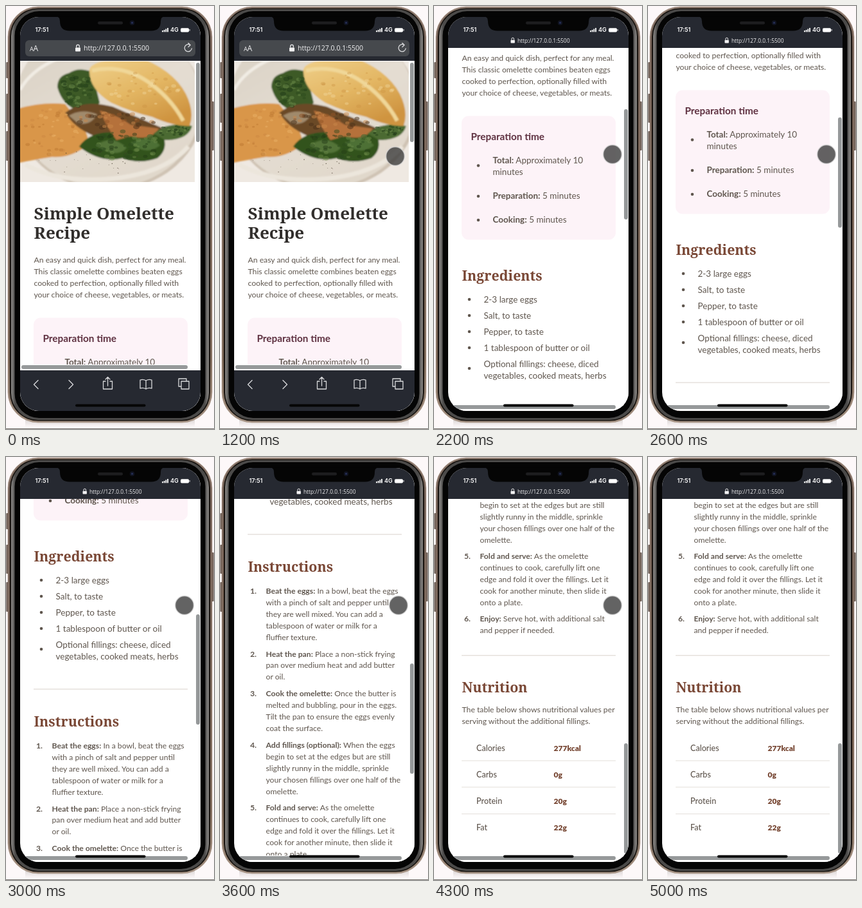
Write an HTML page that moves like this. It is 324 by 656 pixels and loops after 6400 ms.

```html
<!DOCTYPE html>
<html lang="en">
<head>
<meta charset="utf-8">
<title>Recipe page on a phone</title>
<style>
  html, body { margin: 0; width: 100%; height: 100%; overflow: hidden; background: #fdf8f9; }
  svg { display: block; width: 324px; height: 656px; }
  text { font-family: Lato, sans-serif; fill: #5f564e; white-space: pre; }
  .body { font-size: 12.2px; }
  .list { font-size: 13.5px; }
  .cell { font-size: 12.6px; font-weight: 500; }
  .value { font-size: 12px; font-weight: 900; fill: #74432f; }
  .card { font-size: 15.3px; font-weight: 700; fill: #5e3040; }
  .h1, .h2 { font-family: "Noto Serif", serif; font-weight: 600; }
  .h1 { font-size: 26px; fill: #312e2c; }
  .h2 { font-size: 21.4px; fill: #7a4836; }
  .bold { font-weight: 700; }
  .dot { fill: #5f564e; }
  .ui text { font-family: "Open Sans", "Noto Sans", sans-serif; fill: #f1f1f2; }
  .ui .status { font: 600 9px Inter, sans-serif; fill: #fff; }
  .icon { fill: none; stroke: #d9dadc; stroke-width: 1.3; stroke-linecap: round; stroke-linejoin: round; }
</style>
</head>
<body>
<svg viewBox="0 0 324 656">
  <defs>
    <clipPath id="screen"><rect x="22" y="17" width="281" height="611" rx="29"/></clipPath>
    <clipPath id="photo"><rect x="22" width="272" height="187"/></clipPath>
    <linearGradient id="rim" x2="0" y2="1">
      <stop offset="0" stop-color="#8d7a6e"/><stop offset=".1" stop-color="#6d594e"/>
      <stop offset=".85" stop-color="#75604f"/><stop offset="1" stop-color="#a28f80"/>
    </linearGradient>
    <linearGradient id="sheen">
      <stop offset="0" stop-color="#8b8987"/><stop offset=".02" stop-color="#4b4a49"/>
      <stop offset=".98" stop-color="#4b4a49"/><stop offset="1" stop-color="#8b8987"/>
    </linearGradient>
    <linearGradient id="floor" x2="0" y2="1">
      <stop offset="0" stop-color="#d9d3d2"/><stop offset="1" stop-color="#fdf8f9"/>
    </linearGradient>
    <linearGradient id="plate" x1=".2" x2=".8" y2="1">
      <stop offset="0" stop-color="#d9d0c3"/><stop offset=".5" stop-color="#e4ddd2"/><stop offset="1" stop-color="#e0d7ca"/>
    </linearGradient>
    <linearGradient id="egg" x2=".6" y2="1">
      <stop offset="0" stop-color="#efd08a"/><stop offset=".55" stop-color="#e3b663"/><stop offset="1" stop-color="#cf9440"/>
    </linearGradient>
    <filter id="soft"><feGaussianBlur stdDeviation=".8"/></filter>
  </defs>

  <!-- phone body -->
  <rect x="30" y="640" width="264" height="13" fill="url(#floor)"/>
  <rect y="655" width="324" height="1" fill="#77736f"/>
  <g fill="#5d4d44">
    <rect x="0.5" y="87" width="4" height="25" rx="1"/>
    <rect x="0.5" y="136" width="4" height="45" rx="1"/>
    <rect x="0.5" y="194" width="4" height="46" rx="1"/>
    <rect x="319.5" y="148" width="4" height="76" rx="1"/>
  </g>
  <rect x="3" y="1" width="318" height="645" rx="47" fill="url(#rim)" stroke="#b3a195" stroke-width=".8"/>
  <rect x="6" y="3.5" width="312" height="640" rx="44" fill="#17130f"/>
  <rect x="8" y="5" width="308" height="637" rx="42" fill="url(#sheen)"/>
  <rect x="13.5" y="8" width="297" height="631" rx="38" fill="#050505"/>

  <g clip-path="url(#screen)">
    <rect x="22" y="17" width="281" height="611" fill="#fff"/>
    <g id="page">
      <g clip-path="url(#photo)">
        <rect x="22" width="272" height="187" fill="#efe9e2"/>
        <g filter="url(#soft)">
          <ellipse cx="160" cy="70" rx="148" ry="130" fill="#cfc3b4"/>
          <ellipse cx="159" cy="66" rx="145" ry="130" fill="url(#plate)"/>
          <path d="M22 44Q38 14 80 -4" fill="none" stroke="#f1ece4" stroke-width="5"/>
          <path d="M30 160Q90 192 180 180Q250 170 284 132" fill="none" stroke="#ece6dc" stroke-width="7"/>
          <path d="M16 74Q56 62 92 66L116 96Q134 120 124 132Q100 150 72 148Q46 152 16 158Z" fill="#d9964a"/>
          <path d="M80 40Q80 22 98 18Q112 8 134 16L146 64Q134 80 112 76Q88 68 80 40Z" fill="#3d5a27"/>
          <path d="M92 80Q118 58 166 70L250 106Q250 130 216 128L138 116Q104 102 92 78Z" fill="#6b4828"/>
          <path d="M98 84Q118 72 142 82Q132 100 112 96Z" fill="#a08a6c"/>
          <path d="M114 132Q130 108 170 110Q206 98 244 112Q254 136 236 150Q208 160 182 150Q146 158 114 132Z" fill="#33521f"/>
          <path d="M140 130Q166 112 188 134Q172 152 140 130Z" fill="#527337"/>
          <path d="M194 126Q224 112 240 130Q218 148 194 126Z" fill="#4d7034"/>
          <path d="M146 76Q176 84 194 98L238 104Q226 124 194 116L172 122Q158 104 146 76Z" fill="#b5713a"/>
          <path d="M230 112Q252 92 290 100Q284 122 248 122Z" fill="#4c6b31"/>
          <path d="M130 12Q136 -6 214 -4Q262 16 280 50Q294 78 286 100Q258 100 228 86Q194 78 164 64Q128 42 130 12Z" fill="url(#egg)"/>
          <path d="M134 14Q180 4 222 32Q258 58 276 92" fill="none" stroke="#f0d798" stroke-width="6"/>
        </g>
        <g id="texture"></g>
      </g>
      <rect x="43" y="397.5" width="240" height="192" rx="11" fill="#fdf3f8"/>
      <g fill="#e4dfda">
        <rect x="43" y="850.3" width="240" height="1.4"/>
        <rect x="43" y="1428" width="240" height="1.4"/>
        <rect x="43" y="1591.5" width="240" height="1"/>
        <rect x="43" y="1632.5" width="240" height="1"/>
        <rect x="43" y="1674" width="240" height="1"/>
      </g>
      <g id="copy"></g>
    </g>

    <rect x="294" y="17" width="9" height="611" fill="#fff"/>
    <g id="hbar">
      <rect x="22" y="556" width="281" height="80" fill="#fff"/>
      <rect x="24" y="557" width="259" height="6" rx="3" fill="#96999a"/>
    </g>
    <rect id="thumb" x="296" width="6" rx="3" fill="#96999a"/>

    <g class="ui">
      <rect id="head" x="22" y="17" width="281" fill="#262931"/>
      <g id="pill">
        <rect x="30" y="53" width="265" height="25" rx="6" fill="#46494d"/>
        <text x="37" y="69.5" font-size="9">A</text>
        <text x="42.5" y="69.5" font-size="12">A</text>
        <path class="icon" d="M287 60.5A5.6 5.6 0 1 0 289.3 66M284 57.500l3.200 3-3.200 3"/>
      </g>
      <g id="url">
        <rect x="-57.5" y="-1" width="8" height="6" rx="1" fill="#f1f1f2"/>
        <path d="M-55.8 -1v-2a2.3 2.3 0 0 1 4.6 0v2" fill="none" stroke="#f1f1f2" stroke-width="1.2"/>
        <text x="-44.5" y="3.8" font-size="10.5">http://127.0.0.1:5500</text>
      </g>
      <g id="tools">
        <rect x="22" y="565" width="281" height="64" fill="#262931"/>
        <path class="icon" d="M50 580.5l-6.5 6.5 6.5 6.5M98 580.5l6.5 6.5-6.5 6.5
          M155 582h-3.5v12h14v-12H162M158.5 589v-13M155 579l3.5-3.5 3.5 3.5
          M218 581q-4-2.5-9-1v13q5-1.5 9 1q4-2.5 9-1v-13q-5-1.5-9 1zv13
          M273 582h12v12h-12zM273 590h-4v-12h12v4"/>
      </g>
      <text class="status" x="45.5" y="40">17:51</text>
      <g fill="#fff">
        <rect x="243" y="38" width="1.8" height="2.3"/><rect x="245.7" y="37" width="1.8" height="3.3"/>
        <rect x="248.4" y="35.5" width="1.8" height="4.8"/><rect x="251.1" y="34" width="1.8" height="6.3"/>
        <rect x="272" y="34.2" width="13" height="6.3" rx="1.8"/><rect x="285.6" y="36" width="1" height="2.6"/>
      </g>
      <text class="status" x="256" y="40">4G</text>
    </g>
    <rect x="108" y="617.5" width="109.5" height="4" rx="2" fill="#060606"/>
  </g>

  <path d="M78 16.5q6 0 6 7q0 15 15 15h127q15 0 15-15q0-7 6-7z" fill="#050505"/>
  <rect x="143" y="24" width="39" height="4.5" rx="2.2" fill="#1d1d1f"/>
  <circle cx="196.5" cy="26" r="3.8" fill="#10131f"/>
  <circle cx="196.5" cy="26" r="1.6" fill="#27315a"/>
  <circle id="touch" r="14.4" fill="#3c3c3c" fill-opacity=".8" stroke="#d6d6d6" stroke-opacity=".75" stroke-width="1.5"/>
</svg>
<script>
const $ = id => document.getElementById(id);
let copy = '';

// Lines of text; *stars* mark bold runs.
function put(cls, x, y, lines, step = 17.9) {
  lines.split('|').forEach((line, i) => {
    const run = line.replace(/\*(.+?)\*/g, '<tspan class="bold">$1</tspan>');
    copy += `<text class="${cls}" x="${x}" y="${y + i * step}">${run}</text>`;
  });
}
const dot = (x, y) => copy += `<circle class="dot" cx="${x}" cy="${y}" r="2.3"/>`;

put('h1', 43.5, 245, 'Simple Omelette|Recipe', 30);
put('body', 43.5, 312, 'An easy and quick dish, perfect for any meal.|This classic omelette combines beaten eggs|cooked to perfection, optionally filled with|your choice of cheese, vegetables, or meats.');

put('card', 57.5, 434.5, 'Preparation time');
put('list', 91.5, 471.3, '*Total:* Approximately 10|minutes');
put('list', 91.5, 525.5, '*Preparation:* 5 minutes');
put('list', 91.5, 563.3, '*Cooking:* 5 minutes');
[474.5, 522, 559].forEach(y => dot(69, y));

put('h2', 43.5, 653, 'Ingredients');
put('list', 77.5, 686.5, '2-3 large eggs|Salt, to taste|Pepper, to taste|1 tablespoon of butter or oil|Optional fillings: cheese, diced', 25);
put('list', 77.5, 804.5, 'vegetables, cooked meats, herbs');
[682, 707, 732, 757, 789].forEach(y => dot(55, y));

put('h2', 43.5, 909, 'Instructions');
[
  [943, '*Beat the eggs:* In a bowl, beat the eggs|with a pinch of salt and pepper until|they are well mixed. You can add a|tablespoon of water or milk for a|fluffier texture.'],
  [1040.5, '*Heat the pan:* Place a non-stick frying|pan over medium heat and add butter|or oil.'],
  [1102, '*Cook the omelette:* Once the butter is|melted and bubbling, pour in the eggs.|Tilt the pan to ensure the eggs evenly|coat the surface.'],
  [1182, '*Add fillings (optional):* When the eggs|begin to set at the edges but are still|slightly runny in the middle, sprinkle|your chosen fillings over one half of the|omelette.'],
  [1279, '*Fold and serve:* As the omelette|continues to cook, carefully lift one|edge and fold it over the fillings. Let it|cook for another minute, then slide it|onto a plate.'],
  [1376, '*Enjoy:* Serve hot, with additional salt|and pepper if needed.']
].forEach(([y, lines], i) => {
  put('body', 47, y, `*${i + 1}.*`);
  put('body', 71.5, y, lines);
});

put('h2', 43.5, 1486, 'Nutrition');
put('body', 43.5, 1517, 'The table below shows nutritional values per|serving without the additional fillings.');
put('cell', 66, 1576.5, 'Calories|Carbs|Protein|Fat', 41);
put('value', 186.5, 1576.5, '277kcal|0g|20g|22g', 41);
$('copy').innerHTML = copy;

// Seeded flecks inside an ellipse give the food its texture.
let seed = 7, flecks = '';
const rnd = () => (seed = seed * 16807 % 2147483647) / 2147483647;
function scatter(count, cx, cy, rx, ry, size, colors, opacity) {
  for (let i = 0; i < count; i++) {
    const a = rnd() * 2 * Math.PI, d = Math.sqrt(rnd());
    const r = size * (.4 + rnd() * .6);
    flecks += `<ellipse cx="${cx + d * rx * Math.cos(a)}" cy="${cy + d * ry * Math.sin(a)}" rx="${r}" ry="${r * .7}" fill="${colors[i % colors.length]}" opacity="${opacity}"/>`;
  }
}
const greens = ['#1f3816', '#6b8a48', '#2c4a1d'];
scatter(45, 110, 44, 24, 27, 5, greens, .5);
scatter(60, 186, 130, 56, 22, 5, greens, .45);
scatter(30, 262, 109, 24, 10, 3, greens, .6);
scatter(45, 68, 108, 44, 38, 4, ['#b8742f', '#e8b169', '#c98540'], .45);
scatter(40, 170, 92, 62, 12, 5, ['#4a3018', '#c9874a', '#8f5427'], .5);
scatter(40, 212, 42, 58, 28, 4, ['#c98f3f', '#f3dda6'], .35);
scatter(30, 140, 155, 90, 20, 1, ['#493c30'], .8);
$('texture').innerHTML = flecks;

const LOOP = 6400, TICK = 100;
const scrollKeys = [
  [1500, 0], [1600, 18], [2000, 225], [2200, 293], [2400, 310], [2500, 310],
  [2600, 333], [3000, 557], [3200, 685], [3400, 772], [3500, 772],
  [3600, 797], [4000, 1027], [4200, 1155], [4300, 1187]
];
const barKeys = [[1500, 0], [1900, 1]];
const touchX = [[300, 306], [400, 284], [500, 275], [1100, 275], [1200, 273], [1300, 278]];
const touchY = [[300, 222], [400, 232], [500, 235], [1100, 235], [1200, 233], [1300, 230]];

function at(keys, t) {
  const i = keys.findIndex(k => k[0] > t);
  if (i === 0) return keys[0][1];
  if (i < 0) return keys[keys.length - 1][1];
  const [t0, a] = keys[i - 1], [t1, b] = keys[i];
  return a + (b - a) * (t - t0) / (t1 - t0);
}
const set = (id, attrs) => {
  for (const k in attrs) $(id).setAttribute(k, attrs[k]);
};

function draw(now) {
  const t = Math.floor(now % LOOP / TICK) * TICK;
  const scroll = at(scrollKeys, t), bar = at(barKeys, t);
  const top = 86 - 20 * bar;
  set('page', { transform: `translate(0 ${top - scroll})` });
  set('head', { height: top - 18 });
  set('pill', { opacity: 1 - bar });
  set('url', { transform: `translate(165.5 ${65.5 - 12 * bar}) scale(${1 - .2 * bar})` });
  set('tools', { transform: `translate(0 ${64 * bar})` });
  set('hbar', { transform: `translate(0 ${62 * bar})` });
  set('thumb', { y: 88 - 21 * bar + scroll * .3177, height: 123 + 48 * bar });
  set('touch', {
    cx: at(touchX, t), cy: at(touchY, t),
    visibility: t >= 300 && t < 5000 ? 'visible' : 'hidden'
  });
}

const start = performance.now();
(function frame() {
  draw(performance.now() - start);
  requestAnimationFrame(frame);
})();
</script>
</body>
</html>
```
